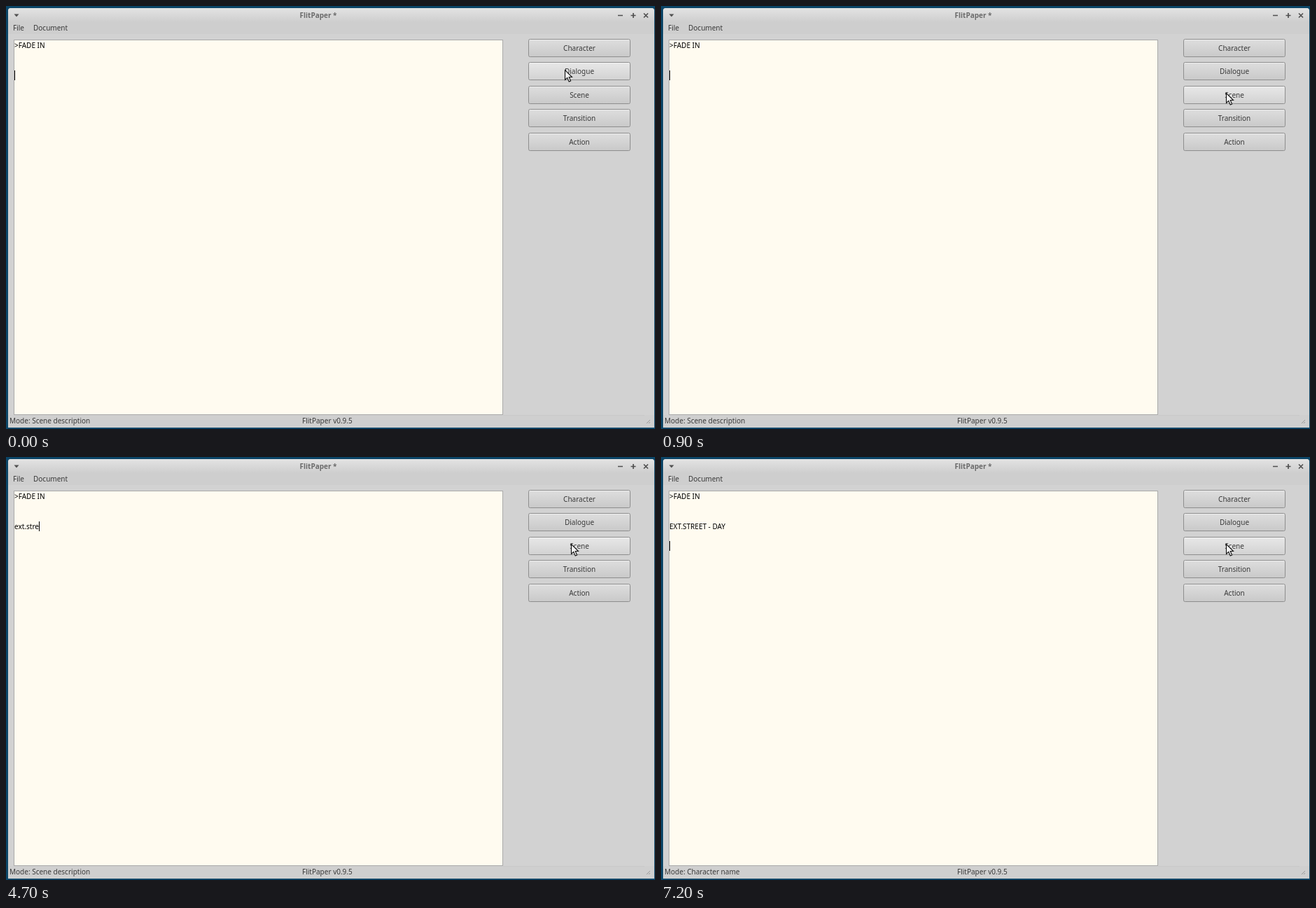
An HTML page for the animation above (8 s loop, 927 by 604 pixels).

```html
<!DOCTYPE html>
<html lang="en">
<head>
<meta charset="utf-8">
<title>Script editor</title>
<style>
  html, body { margin: 0; width: 100%; height: 100%; overflow: hidden; background: #0b4567; }
  svg { display: block; }
  text { font: 10px "Noto Sans", sans-serif; fill: #3a3a3a; white-space: pre; }
  .title { font-weight: bold; fill: #6a6a6a; text-anchor: middle; }
  .page { fill: #000; }
  .button text { text-anchor: middle; }
  .button rect { fill: url(#normal); stroke: #8e8e8e; }
  .button path { stroke: #fff; stroke-opacity: .45; }
  .button.hover rect { fill: url(#hover); }
  .button.pressed rect { fill: url(#pressed); }
  .button.pressed path { stroke-opacity: 0; }
</style>
</head>
<body>
<svg width="927" height="604" viewBox="0 0 927 604">
  <defs>
    <linearGradient id="bar" x2="0" y2="1"><stop stop-color="#e3e3e3"/><stop offset="1" stop-color="#cecece"/></linearGradient>
    <linearGradient id="normal" x2="0" y2="1"><stop stop-color="#dedede"/><stop offset="1" stop-color="#c9c9c9"/></linearGradient>
    <linearGradient id="hover" x2="0" y2="1"><stop stop-color="#e8e8e8"/><stop offset="1" stop-color="#d2d2d2"/></linearGradient>
    <linearGradient id="pressed" x2="0" y2="1"><stop stop-color="#b4b4b4"/><stop offset="1" stop-color="#c0c0c0"/></linearGradient>
  </defs>

  <!-- window -->
  <path d="M3 602V7a4 4 0 0 1 4-4H922a4 4 0 0 1 4 4V602Z" fill="#d2d2d2"/>
  <path d="M3 23V7a4 4 0 0 1 4-4H922a4 4 0 0 1 4 4V23Z" fill="url(#bar)"/>
  <rect x="3" y="23" width="923" height="17" fill="#cecece"/>
  <rect x="3" y="584" width="923" height="18" fill="#cfcfcf"/>
  <path d="M710 584.5H912" stroke="#c9c9c9"/>
  <path d="M11.5 11.5h7l-3.5 4Z" fill="#505050"/>
  <path d="M874 13.5h7M892.5 13.5h7M896 10v7M911 10.5l6 6M917 10.5l-6 6" stroke="#505050" stroke-width="1.7"/>
  <path d="M915 596l5-5M918 596l2-2" stroke="#999"/>
  <text class="title" x="446" y="17">FlitPaper *</text>
  <text x="10" y="35">File</text>
  <text x="39" y="35">Document</text>
  <text id="mode" x="5" y="596"></text>
  <text x="423" y="596">FlitPaper v0.9.5</text>

  <!-- page -->
  <rect x="11.5" y="48.5" width="698" height="535" fill="#fffbf0" stroke="#aaa"/>
  <text class="page" x="12" y="60">&gt;FADE IN</text>
  <text class="page" id="line" x="12" y="103"></text>
  <rect id="caret" width="1" height="14"/>

  <g id="buttons"></g>
  <path id="pointer" d="M.5 .5V14.5L3.7 11.4L6.2 17L8.6 16L6.2 10.5H10.5Z" fill="#f4f4f4" stroke="#111" stroke-width="1.1"/>
</svg>
<script>
const $ = id => document.getElementById(id);
const LOOP = 8000, ENTER = 7200;

const labels = ["Character", "Dialogue", "Scene", "Transition", "Action"];
const tops = labels.map((_, i) => Math.floor(47.4 + i * 33.5));
$("buttons").innerHTML = labels.map((label, i) => `
  <g class="button" transform="translate(746 ${tops[i]})">
    <rect x=".5" y=".5" width="145" height="25" rx="2"/>
    <path d="M2 1.5H144"/>
    <text x="73" y="16.5">${label}</text>
  </g>`).join("");
const buttons = [...$("buttons").children];

// [time, typed so far]
const typing = [
  [2000, "e"], [2400, "ex"], [3100, "ext"], [3300, "ext."], [4200, "ext.s"],
  [4500, "ext.st"], [4600, "ext.str"], [4700, "ext.stre"], [4800, "ext.stree"],
  [4900, "ext.street"], [5600, "ext.street -"], [5700, "ext.street - "],
  [6100, "ext.street - d"], [6200, "ext.street - da"], [6300, "ext.street - day"]
];
const caretOff = [[100, 600], [800, 900], [1300, 1800]];
const within = (t, [from, to]) => t >= from && t < to;

function draw(t) {
  const entered = t >= ENTER;
  const typed = typing.reduce((text, [time, next]) => t >= time ? next : text, "");
  $("line").textContent = entered ? typed.toUpperCase() : typed;
  $("mode").textContent = "Mode: " + (entered ? "Character name" : "Scene description");

  const width = entered || !typed ? 0 : Math.round($("line").getComputedTextLength());
  $("caret").setAttribute("x", 12 + width);
  $("caret").setAttribute("y", entered ? 120 : 92);
  $("caret").setAttribute("opacity", caretOff.some(span => within(t, span)) ? 0 : 1);

  const moved = Math.min(6, Math.floor(t / 100)) / 6;
  const x = Math.round(798 + 9 * moved), y = Math.round(91 + 33 * moved);
  $("pointer").setAttribute("transform", `translate(${x} ${y})`);
  buttons.forEach((button, i) => {
    const hover = within(y, [tops[i], tops[i] + 26]);
    button.classList.toggle("hover", hover);
    button.classList.toggle("pressed", hover && within(t, [800, 900]));
  });
}

function tick() {
  draw(performance.now() % LOOP);
  requestAnimationFrame(tick);
}
tick();
</script>
</body>
</html>
```
